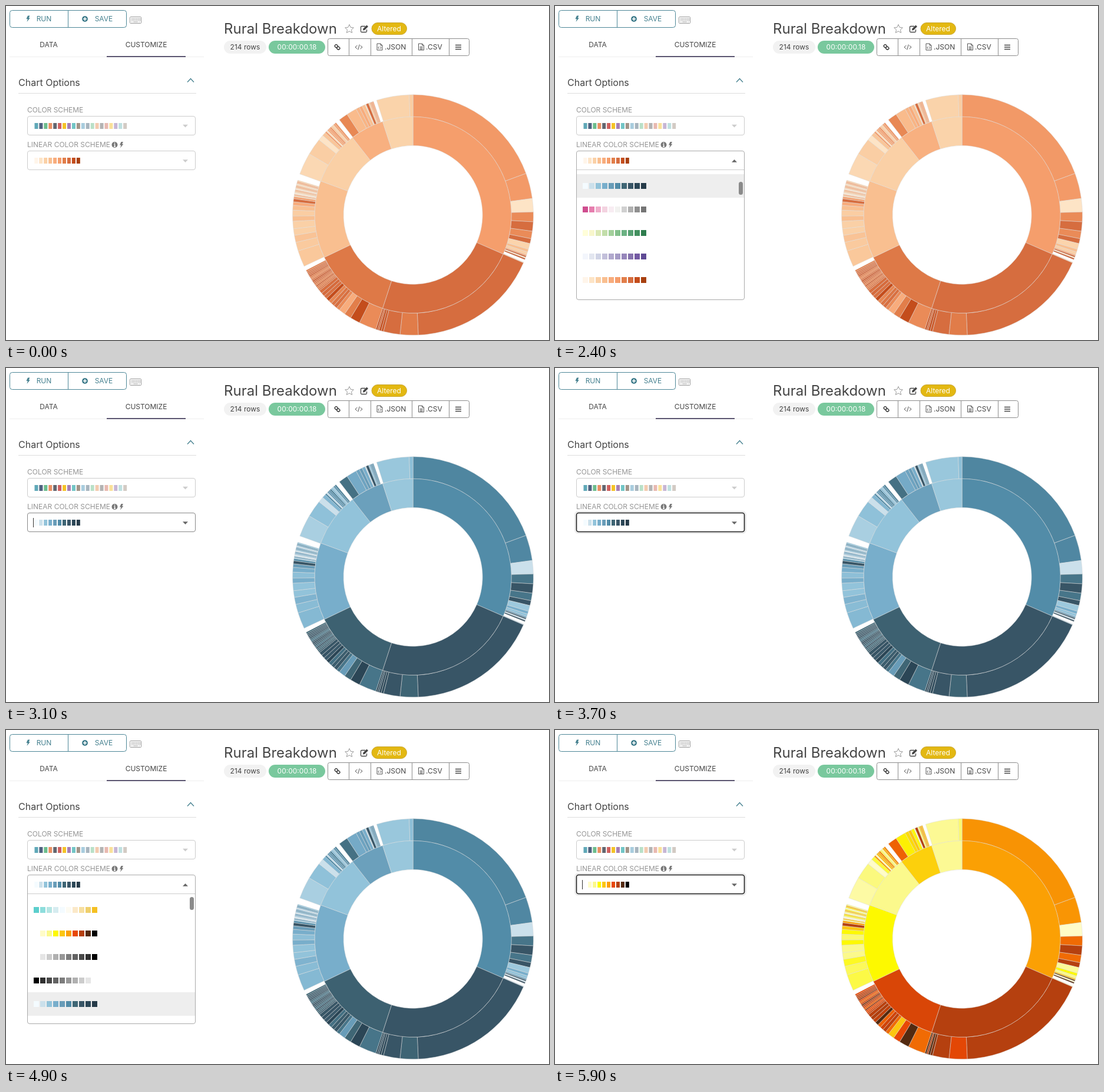
These frames come from a looping animation (922 by 568 pixels, 6 s). An HTML page:

```html
<!DOCTYPE html>
<html lang="en">
<head>
<meta charset="utf-8">
<title>Chart color schemes</title>
<style>
  html, body { margin: 0; width: 100%; height: 100%; overflow: hidden; background: #fff; }
  svg { display: block; width: 922px; height: 568px; }
  text { font-family: Inter, "Open Sans", sans-serif; font-size: 12px; fill: #444; }
  .mid { text-anchor: middle; }
  .teal { fill: #45808f; }
  .label { fill: #959595; }
  .line { fill: none; stroke: #555; stroke-width: 1; }
  .ring path { stroke: #ddd; stroke-width: .5; }
</style>
</head>
<body>
<svg id="stage" viewBox="0 0 922 568" xmlns="http://www.w3.org/2000/svg">
  <defs>
    <path id="bolt" d="M-.5-5H3L1-1.3H3.3L-2 5.5-.6.6H-3z"/>
    <path id="page" d="M-4.5-5.5H1.5L4.5-2.5V5.5H-4.5ZM1.5-5.5V-2.5H4.5"/>
    <path id="tri" d="M-4.5-2.3H4.5L0 2.5z"/>
    <clipPath id="lower"><rect x="140" y="326" width="80" height="30"/></clipPath>
  </defs>

  <g id="toolbar">
    <rect x="6.5" y="7.5" width="198" height="29" rx="4" fill="#fff" stroke="#4d8797"/>
    <path d="M105.5 7.5V36.5" stroke="#4d8797"/>
    <use href="#bolt" x="37.500" y="21.500" class="teal"/>
    <text x="64.500" y="26" class="mid teal">RUN</text>
    <circle cx="134" cy="22" r="5" class="teal"/>
    <path d="M131 22H137M134 19V25" stroke="#fff" stroke-width="1.600"/>
    <text x="166" y="26" class="mid teal">SAVE</text>
    <rect x="210.500" y="18.500" width="19" height="11" rx="1" class="line" style="stroke:#999"/>
    <path d="M213 21.500H228M213 24H228" stroke="#999" stroke-width="1.300" stroke-dasharray="1.500 1.200"/>
    <path d="M213 27H214.500M216 27H224M225.500 27H227" stroke="#999" stroke-width="1.200"/>
  </g>

  <g id="tabs">
    <path d="M6 86.500H336" stroke="#eee"/>
    <rect x="171" y="85" width="134" height="2" fill="#5b5570"/>
    <text x="72.500" y="70" class="mid">DATA</text>
    <text x="238" y="70" class="mid">CUSTOMIZE</text>
  </g>

  <g id="options">
    <text x="21" y="136" style="font-size:16px">Chart Options</text>
    <path d="M308 129.500L313.500 123.500 319 129.500" fill="none" stroke="#45808f" stroke-width="1.300"/>
    <path d="M21 148.500H323" stroke="#ddd"/>
    <text x="36" y="181" class="label">COLOR SCHEME</text>
    <text x="36" y="240" class="label">LINEAR COLOR SCHEME</text>
    <circle cx="184.500" cy="236" r="5" fill="#777"/>
    <path d="M184.500 232.300V234M183.300 235.500H184.700V238.800M183 239H186" stroke="#fff" stroke-width="1.300" fill="none"/>
    <use href="#bolt" x="196" y="236" fill="#777"/>
    <rect x="36.500" y="187.500" width="285" height="32" rx="3.500" fill="#fff" stroke="#ccc"/>
    <use href="#tri" x="304.500" y="204" fill="#ccc"/>
  </g>

  <g id="header">
    <text x="370" y="47" style="font-size:24px">Rural Breakdown</text>
    <path d="M583 31.500L585.200 36.300 590.300 36.900 586.500 40.400 587.600 45.500 583 42.900 578.400 45.500 579.500 40.400 575.700 36.900 580.800 36.300Z" class="line" style="stroke:#999"/>
    <path d="M610 34.500H604Q602.500 34.500 602.500 36V43Q602.500 44.500 604 44.500H611Q612.500 44.500 612.500 43V40" class="line" style="stroke:#444;stroke-width:1.300"/>
    <path d="M606 41.500L606.500 38.600 612.500 32.600 615 35.100 609 41Z" fill="#444"/>
    <rect x="621" y="28.500" width="59.500" height="20" rx="10" fill="#e3b812" stroke="#c9a52c"/>
    <text x="650.500" y="43" class="mid" style="fill:#fff">Altered</text>
    <rect x="370" y="59" width="72" height="22" rx="11" fill="#f2f2f2"/>
    <text x="406" y="74" class="mid">214 rows</text>
    <rect x="446" y="59" width="96" height="22" rx="11" fill="#79c89d"/>
    <text x="494" y="74" class="mid" style="fill:#fff">00:00:00.18</text>
    <rect x="546.500" y="55.500" width="240" height="29" rx="3" class="line" style="stroke:#8c8c8c"/>
    <path d="M582.500 55.500V84.500M619.500 55.500V84.500M689.500 55.500V84.500M752.500 55.500V84.500" stroke="#8c8c8c"/>
    <g class="line" style="stroke-width:1.500;stroke:#444">
      <rect x="558.500" y="66" width="5" height="4.500" rx="2" transform="rotate(45 561 68)"/>
      <rect x="562" y="69.500" width="5" height="4.500" rx="2" transform="rotate(45 564.500 71.500)"/>
    </g>
    <path d="M596.500 67L593 70 596.500 73M601.500 67L605 70 601.500 73M600.200 65.500L597.800 74.500" class="line"/>
    <use href="#page" x="634.500" y="69.500" class="line"/>
    <path d="M633.500 69L631.800 71 633.500 73M635.500 69L637.200 71 635.500 73" class="line"/>
    <text x="643" y="74">.JSON</text>
    <use href="#page" x="705" y="69.500" class="line"/>
    <path d="M702.500 69.500H707.500M702.500 71.500H707.500M702.500 73.500H707.500" class="line"/>
    <text x="713" y="74">.CSV</text>
    <path d="M763 66.500H773M763 70H773M763 73.500H773" stroke="#444" stroke-width="1.500"/>
  </g>

  <g id="charts"></g>

  <g id="select">
    <rect id="glow" x="34.500" y="244.500" width="289" height="36" rx="5" fill="none" stroke="#000" stroke-opacity=".08" stroke-width="3"/>
    <rect id="box" x="36.500" y="246.500" width="285" height="32" rx="3.500" fill="#fff"/>
    <g id="menu">
      <path d="M37 278.500H321" stroke="#ccc"/>
      <rect id="hover" x="37" width="284" height="40" fill="#eee"/>
      <g id="lists"></g>
      <rect id="thumb" x="312" width="7" height="22" rx="3.500" fill="#8a8a8a"/>
    </g>
    <use id="arrow" href="#tri"/>
    <g id="picked"></g>
    <path id="caret" d="M46.500 255V271" stroke="#333"/>
    <g id="tip">
      <ellipse cx="181" cy="329" rx="35" ry="19" fill="#f4f4f4" clip-path="url(#lower)"/>
      <path d="M165 288H193Q196 288 196 291V317Q196 320 193 320H182.500L179 323.500 175.500 320H165Q162 320 162 317V291Q162 288 165 288Z" fill="#333"/>
      <text x="179" y="308" class="mid" style="fill:#fff">fire</text>
    </g>
  </g>
</svg>

<script>
const $ = id => document.getElementById(id);
const split = s => s.split(' ').map(c => '#' + c);

const schemes = {
  oranges: split('fff5ea fde4c6 fad0a6 f9bf90 f8ac7c f59e6c e27e4a d66d3f c44d1c a8400f'),
  blues: split('f4fbff cbe0eb 92c3da 78aecb 689cb8 528ca8 3f6675 385566 2b4656 263b49'),
  fire: split('ffffff fffcc8 fbf98c fdf900 fcc60f fba004 e84804 b5400f 532a10 000000'),
  pinks: split('cf4d8f e67eae efaecb f3d3e0 f8edf2 f2f2f0 d0d0d0 b0b0b0 909090 757575'),
  greens: split('fffed9 f8f6cc dbe8b5 c3deaa a3d09b 84c08c 6bb283 57a173 43905f 2f7d4e'),
  purples: split('f3f6fc e2e6f0 d0d4e6 c3c0da b0a8cd a59bc6 9686bb 8672ae 7459a3 5f4a94'),
  tealGold: split('5ccfcd 8edddc b6e6e4 d6ecf0 f4fbff fdfbf2 fbe9c9 f7dfa0 efd06d f5c022'),
  whiteBlack: split('ffffff e5e5e5 cccccc b0b0b0 979797 7c7c7c 636363 494949 303030 000000')
};
schemes.blackWhite = [...schemes.whiteBlack].reverse();

const categories = split('5fa8b8 4f6280 6cbd8d ea9063 63666f cf6060 f5c326 a77fb5 72c5c6 a29488 ' +
  'a9cdde a8b5be b9e0c8 f2cbb0 b3b3b3 e8b9b0 f9e19a c7b6d4 bfe0e0 d3cbc4');

function shade(scheme, level) {
  const i = Math.min(8, Math.floor(level)), k = level - i;
  const part = (c, n) => parseInt(c.substr(1 + 2 * n, 2), 16);
  return `rgb(${[0, 1, 2].map(n =>
    Math.round(part(scheme[i], n) * (1 - k) + part(scheme[i + 1], n) * k))})`;
}

// Sunburst: each slice is [end angle, level]; a level of null is a gap.
const cx = 691.1, cy = 355.3, radii = [118, 167, 204.5];
const inner = [[113.5, 5], [198, 7], [244.4, 6.3], [290.2, 3], [322, 2], [342, 3.8], [360, 1.87]];

let seed = 11;
const random = () => (seed = seed * 16807 % 2147483647) / 2147483647;

function stripes(from, to, count, low, high) {
  return Array.from({ length: count }, (_, i) =>
    [from + (to - from) * (i + 1) / count, low + (high - low) * random()]);
}

const outer = [
  [69.8, 5.15], [82.1, 5.12], [88.6, 1], [93.3, 5.6], [97.8, 7], [101.4, 5.6], [103.8, 7],
  [106.6, 1.8], [108, 3], [109.3, 2], [110, 4], [110.6, 8], [111.2, 1], [111.8, 8], [113.1, null], [113.5, 1],
  [177.5, 7], [186.2, 6.1], [194.2, 7], [195.4, 7.5], [196.4, 8], [197.2, 7], [198, 8],
  [206.4, 5.6], [211.2, 8], [214.6, 6], [217.7, 4],
  ...stripes(217.7, 231, 8, 5.6, 8.4), ...stripes(231, 242.6, 16, 5.4, 8), [244.7, null],
  [252.6, 2.5], [256.8, 2.35], [260.2, 2.75], [263.4, 2], [267, 2], [269.5, 3], [272.3, 2.2], [274.6, 3],
  [276.3, 4], [277.8, 7], [278.8, 5], ...stripes(278.8, 286.8, 14, .5, 5), [289.9, null],
  [300.5, 1.6], [308.7, 2.1], [311.4, 1], [313.2, 2.6],
  ...stripes(313.2, 320.2, 9, 1, 5.5), [322.3, null],
  [326.8, 5.7], [331.8, 3.2], [333.5, 3.6], [335, 4], [336.5, 3], [337, 1], [338.3, 7], [339, 2],
  ...stripes(339, 340.8, 3, 1, 5), [342.4, null], [358.2, 1.87], [360, 2.2]
];

function arcPath(a, b, r0, r1) {
  const at = (deg, r) => {
    const w = deg * Math.PI / 180;
    return `${(cx + r * Math.sin(w)).toFixed(2)} ${(cy - r * Math.cos(w)).toFixed(2)}`;
  };
  return `M${at(a, r1)}A${r1} ${r1} 0 0 1 ${at(b, r1)}L${at(b, r0)}A${r0} ${r0} 0 0 0 ${at(a, r0)}Z`;
}

function ring(slices, r0, r1, scheme) {
  let start = 0;
  return slices.map(([end, level]) => {
    const d = arcPath(start, end, r0, r1);
    start = end;
    return level === null ? '' : `<path d="${d}" fill="${shade(scheme, level)}"/>`;
  }).join('');
}

const swatches = (colors, x, y, step, width) => colors.map((c, i) =>
  `<rect x="${x + i * step}" y="${y}" width="${width}" height="10" fill="${c}"/>`).join('');

const used = ['oranges', 'blues', 'fire'];
for (const name of used) {
  const s = schemes[name];
  $('charts').innerHTML += `<g class="ring" id="chart-${name}">` +
    ring(outer, radii[1], radii[2], s) + ring(inner, radii[0], radii[1], s) + '</g>';
  $('picked').innerHTML += `<g id="pick-${name}">${swatches(s, 48.3, 258, 7.95, 6)}</g>`;
}
$('options').innerHTML += swatches(categories, 48.5, 199, 7.93, 6);

const lists = [
  ['blues', 'pinks', 'greens', 'purples', 'oranges'],
  ['tealGold', 'fire', 'whiteBlack', 'blackWhite', 'blues']
];
$('lists').innerHTML = lists.map((names, n) => `<g id="list${n}">` +
  names.map((name, i) => swatches(schemes[name], 47, 301 + 40 * i, 11, 9)).join('') + '</g>').join('');

// Each step holds until the next one; row -1 means no option is hovered.
const steps = [
  { at: 0, chart: 'oranges', pick: 'oranges', border: '#ccc', arrow: '#ccc' },
  { at: 1500, border: '#bbb', arrow: '#666' },
  { at: 1800, list: 0, row: 4, border: '#aaa' },
  { at: 2100, row: 3 },
  { at: 2200, row: 1 },
  { at: 2300, row: 0 },
  { at: 3000, list: null, pick: 'blues', border: '#888', caret: true },
  { at: 3100, chart: 'blues' },
  { at: 3200, border: '#222', focus: true },
  { at: 3600, caret: false },
  { at: 4100, list: 1, row: 4, border: '#aaa', focus: false },
  { at: 5300, row: -1 },
  { at: 5400, tip: true },
  { at: 5600, row: 1 },
  { at: 5700, list: null, tip: false, pick: 'fire', border: '#888', caret: true },
  { at: 5800, chart: 'fire', border: '#222', focus: true }
];
const idle = { list: null, row: -1, tip: false, caret: false, focus: false };

const show = (id, on) => { $(id).style.display = on ? '' : 'none'; };
const set = (id, attrs) => { for (const k in attrs) $(id).setAttribute(k, attrs[k]); };

function draw(t) {
  const s = Object.assign({}, idle, ...steps.filter(step => step.at <= t));
  const open = s.list !== null;
  for (const name of used) {
    show('chart-' + name, s.chart === name);
    show('pick-' + name, s.pick === name);
  }
  lists.forEach((_, n) => show('list' + n, s.list === n));
  show('menu', open);
  show('hover', s.row >= 0);
  show('tip', s.tip);
  show('caret', s.caret);
  show('glow', s.focus);
  set('box', { height: open ? 253 : 32, stroke: s.border, 'stroke-width': s.focus ? 1.6 : 1 });
  set('hover', { y: 286 + 40 * s.row });
  set('thumb', { y: s.list === 0 ? 299 : 284 });
  set('arrow', { fill: s.arrow, transform: `translate(304.5 263.5) scale(1 ${open ? -1 : 1})` });
}

const begin = performance.now();
function tick() {
  draw((performance.now() - begin) % 6000);
  requestAnimationFrame(tick);
}
tick();
</script>
</body>
</html>
```
